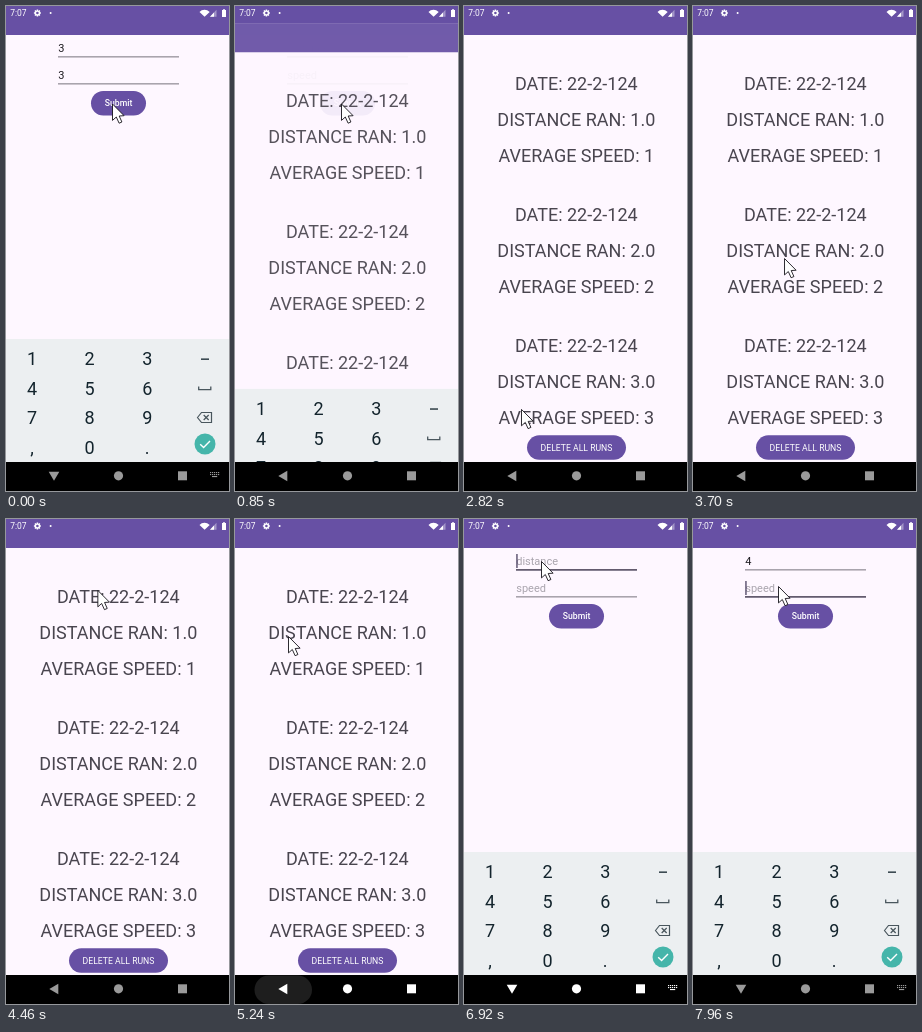
Write an HTML page with a canvas that moves like this. It is 223 by 485 pixels and loops after 8 s.

```html
<!DOCTYPE html>
<html lang="en">
<head>
<meta charset="utf-8">
<title>Run tracker</title>
<style>
html, body { margin: 0; width: 100%; height: 100%; overflow: hidden; background: #000; }
canvas { display: block; width: 223px; height: 485px; }
</style>
</head>
<body>
<canvas id="stage"></canvas>
<script>
const W = 223, H = 485, LOOP = 8000;
const BAR = 29, NAV_TOP = 456, KEYS_H = 123;
const PURPLE = '#6750a4', PAGE = '#fef7ff', KEY_INK = '#13242d', KEY_GRAY = '#49565d';
const canvas = document.getElementById('stage');
const ctx = canvas.getContext('2d');
const scale = window.devicePixelRatio || 1;
canvas.width = W * scale;
canvas.height = H * scale;

const SUBMIT = { x: 106.5, y: 98 }, BACK = { x: 51, y: 465 };
const DISTANCE = { x: 77.5, y: 42.5 }, SPEED = { x: 85.5, y: 67.5 };
const moves = [
  { from: 1560, to: 1860, x: 131, y: 260 },
  { from: 1860, to: 2320, ...BACK },
  { from: 2770, to: 3100, x: 82, y: 171 },
  { from: 3100, to: 3640, x: 89, y: 318 },
  { from: 3640, to: 4000, x: 100, y: 32 },
  { from: 4000, to: 4240, x: 92, y: 70 },
  { from: 4460, to: 4840, ...BACK },
  { from: 4970, to: 5240, x: 53.5, y: 117.5 },
  { from: 5290, to: 5820, ...DISTANCE },
  { from: 7500, to: 7880, ...SPEED }
];

const progress = (t, from, to) => Math.max(0, Math.min(1, (t - from) / (to - from)));
const pulse = (t, on, off, fade) => progress(t, on, on + fade) * (1 - progress(t, off, off + fade));
const mix = (a, b, p) => a + (b - a) * p;
const easeOut = (p, power) => 1 - (1 - p) ** power;
const during = (t, from, to) => t >= from && t < to;

function pointerAt(t) {
  let { x, y } = SUBMIT;
  for (const move of moves) {
    const p = easeOut(progress(t, move.from, move.to), 1.4);
    x = mix(x, move.x, p);
    y = mix(y, move.y, p);
  }
  return [x, y];
}

function rect(x, y, w, h, color) {
  ctx.fillStyle = color;
  ctx.fillRect(x, y, w, h);
}

function pillPath(x, y, w, h) {
  ctx.beginPath();
  ctx.roundRect(x, y, w, h, h / 2);
}

function pill(x, y, w, h, color) {
  pillPath(x, y, w, h);
  ctx.fillStyle = color;
  ctx.fill();
}

function disc(x, y, r, color) {
  ctx.fillStyle = color;
  ctx.beginPath();
  ctx.arc(x, y, r, 0, Math.PI * 2);
  ctx.fill();
}

function trace(points, closed) {
  ctx.beginPath();
  points.forEach(([x, y]) => ctx.lineTo(x, y));
  if (closed) ctx.closePath();
}

function shape(points, color) {
  trace(points, true);
  ctx.fillStyle = color;
  ctx.fill();
}

function stroke(points, color, width, closed = false) {
  trace(points, closed);
  ctx.strokeStyle = color;
  ctx.lineWidth = width;
  ctx.stroke();
}

function text(str, x, y, size, color, align = 'left', weight = 400) {
  ctx.font = `${weight} ${size}px Roboto, sans-serif`;
  ctx.textAlign = align;
  ctx.fillStyle = color;
  ctx.fillText(str, x, y);
}

function button(label, y, w, weight = 500) {
  pill(112.5 - w / 2, y, w, 24.5, PURPLE);
  text(label, 112.5, y + 15.3, 8.67, '#fff', 'center', weight);
}

function page() {
  rect(0, 0, W, H, PAGE);
  rect(0, 0, W, BAR, PURPLE);
}

function field(y, value, hint, focusedFor) {
  const focused = focusedFor >= 0;
  const thick = focused ? 1.4 : 0.8;
  text(value || hint, 52.2, y, 11, value ? '#1d1b20' : '#aaa5ae');
  rect(52, y + 4.9 - thick / 2, 121, thick, focused ? '#3d364b' : '#57525d');
  if (focused && focusedFor % 900 < 450) rect(value ? 59 : 52.3, y - 11, 1.3, 14, '#4a4060');
}

function drawForm(t) {
  page();
  const submitted = t >= 480;
  const distance = !submitted ? '3' : t >= 7290 ? '4' : '';
  const speedFocus = t - 7880;
  field(46, distance, 'distance', speedFocus < 0 ? t - 6020 : -1);
  field(73, submitted ? '' : '3', 'speed', speedFocus);
  button('Submit', 85, 55);
  drawRipple(progress(t, 340, 580));
  button('Check Current Progress', 429.3, 119);
}

function drawRipple(p) {
  if (p === 0 || p === 1) return;
  ctx.save();
  pillPath(85, 85, 55, 24.5);
  ctx.clip();
  disc(mix(SUBMIT.x, 112.5, p), 97, 10 + 24 * p, `rgba(255,255,255,${0.2 * (1 - p * p)})`);
  ctx.restore();
}

function drawList(t) {
  const enter = progress(t, 730, 1150), leave = progress(t, 5290, 5500);
  if (enter === 0 || leave === 1) return;
  const offset = 39 * ((1 - enter) ** 2.4 + leave ** 2);
  ctx.save();
  ctx.globalAlpha = progress(t, 730, 860) * (1 - leave);
  ctx.translate(0, offset);
  page();
  rect(0, -offset, W, offset, PURPLE);
  for (let run = 1; run <= 3; run++) {
    const lines = ['DATE: 22-2-124', `DISTANCE RAN: ${run}.0`, `AVERAGE SPEED: ${run}`];
    lines.forEach((line, i) =>
      text(line, 112.3, 83.8 + (run - 1) * 131.2 + i * 35.9, 18, '#49454f', 'center'));
  }
  button('DELETE ALL RUNS', 429.3, 99, 400);
  ctx.restore();
}

function drawKeyboard(t) {
  const shown = 1 - progress(t, 730, 920) + progress(t, 6080, 6230);
  if (shown === 0) return;
  ctx.save();
  ctx.translate(0, KEYS_H * (1 - shown) ** 2);
  rect(0, NAV_TOP - KEYS_H, W, KEYS_H, '#eceff1');
  ['123', '456', '789', ',0.'].forEach((row, r) => [...row].forEach((key, c) =>
    text(key, 26 + c * 57.6, 359.4 + r * 29.4, 18, KEY_INK, 'center')));
  rect(195, 352.5, 8, 1.3, KEY_INK);
  stroke([[192.7, 380.5], [192.7, 383.7], [204.8, 383.7], [204.8, 380.5]], KEY_GRAY, 1.3);
  stroke([[191.5, 411.5], [195.5, 406.5], [205.5, 406.5], [205.5, 416.5], [195.5, 416.5]], KEY_GRAY, 1.2, true);
  for (const d of [-2.5, 2.5]) stroke([[197.7, 411.5 - d], [202.7, 411.5 + d]], KEY_GRAY, 1.2);
  disc(199, 438, 10.5, '#45b5aa');
  stroke([[194.2, 438.2], [197.6, 441.5], [204, 435]], '#fff', 1.4);
  ctx.restore();
}

function drawNav(t) {
  rect(0, NAV_TOP, W, H - NAV_TOP, '#000');
  const press = pulse(t, 4860, 5240, 120);
  pill(19.5, 456.5, 57.5, 28.5, `rgba(255,255,255,${0.12 * press})`);
  const level = Math.round(mix(154, 255, pulse(t, 4850, 7150, 140)));
  const tint = `rgb(${level},${level},${level})`;
  const typing = !during(t, 820, 5900);

  ctx.save();
  ctx.translate(48, 470);
  if (typing) ctx.rotate(-Math.PI / 2);
  shape([[4.3, -5.3], [4.3, 5.3], [-4.7, 0]], tint);
  ctx.restore();
  disc(112.5, 469.8, 4.6, tint);
  rect(172, 465.3, 9, 9, tint);

  if (!typing) return;
  for (let i = 0; i < 10; i++) rect(204 + (i % 5) * 2, 466 + (i > 4) * 2, 1.2, 1.1, tint);
  rect(206, 470, 5.2, 1.1, tint);
}

function drawStatus() {
  const white = '#fff';
  text('7:07', 4.2, 10.3, 8.5, white);
  for (let i = 0; i < 4; i++) {
    const a = i * Math.PI / 4, x = Math.cos(a) * 3.5, y = Math.sin(a) * 3.5;
    stroke([[31.4 - x, 7 - y], [31.4 + x, 7 + y]], white, 1.5);
  }
  disc(31.4, 7, 2.6, white);
  disc(31.4, 7, 1.3, PURPLE);
  disc(44.6, 7, 1, white);
  ctx.beginPath();
  ctx.moveTo(198.6, 10.8);
  ctx.arc(198.6, 10.8, 7, -Math.PI * 0.76, -Math.PI * 0.24);
  ctx.fill();
  shape([[204, 10.8], [210.5, 10.8], [210.5, 3.8]], 'rgba(255,255,255,0.4)');
  shape([[204, 10.8], [208, 10.8], [208, 6.5]], white);
  rect(216, 4, 4, 7, white);
  rect(217.1, 3.2, 1.8, 1, white);
}

function drawPointer(t) {
  ctx.save();
  ctx.translate(...pointerAt(t));
  ctx.lineJoin = 'round';
  const arrow = [[0, 0], [0, 16.4], [3.8, 13], [6.6, 19.2], [9.4, 18], [6.7, 12], [11.6, 11.7]];
  shape(arrow, '#fff');
  stroke(arrow, '#16131a', 0.9, true);
  ctx.restore();
}

const start = performance.now();
function tick() {
  const t = (performance.now() - start) % LOOP;
  ctx.setTransform(scale, 0, 0, scale, 0, 0);
  drawForm(t);
  drawList(t);
  drawKeyboard(t);
  drawNav(t);
  drawStatus();
  drawPointer(t);
  requestAnimationFrame(tick);
}
tick();
</script>
</body>
</html>
```
